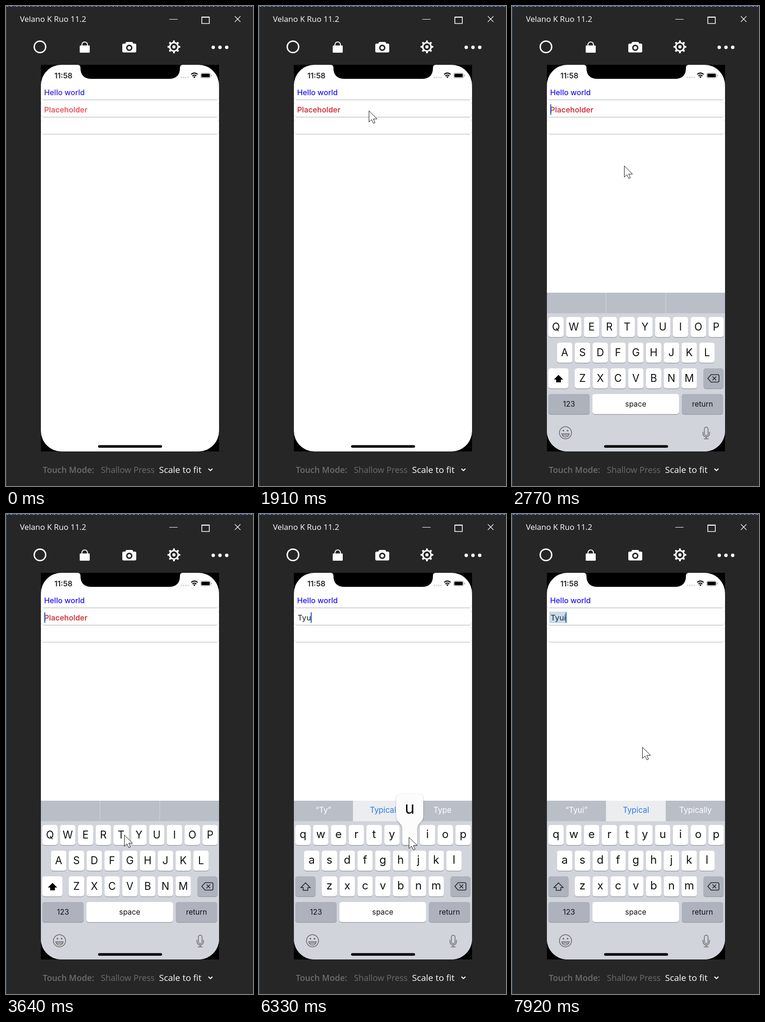
An HTML page with a canvas that plays this animation: 531x1028 px, repeating every 8 s.

```html
<!DOCTYPE html>
<html lang="en">
<head>
<meta charset="utf-8">
<title>Text entry</title>
<style>
  html, body { margin: 0; width: 531px; height: 1028px; overflow: hidden; background: #262626; }
  canvas { display: block; }
</style>
</head>
<body>
<canvas id="stage" width="531" height="1028"></canvas>
<script>
const c = document.getElementById('stage').getContext('2d');
const LOOP = 8000, UI = '"Open Sans", sans-serif', PHONE = 'Inter, sans-serif';
const ROWS = ['qwertyuiop', 'asdfghjkl', 'zxcvbnm'];
const ROW_X = [78, 96.7, 135], ROW_Y = [666, 721, 776], PITCH = 38.25, KEY_W = 33, KEY_H = 43;

// Timed states: the last entry whose time has passed applies.
const TYPED = [[0, ''], [4130, 'T'], [5180, 'Ty'], [6330, 'Tyu'], [7520, 'Tyui']];
const POPUP = [[0, ''], [3860, 'T'], [4200, ''], [4930, 'y'], [5250, ''],
  [6110, 'u'], [6440, ''], [7260, 'i'], [7590, '']];
const HINTS = [[0, []], [4200, ['“T”', 'The', 'This']], [5250, ['“Ty”', 'Typical', 'Type']],
  [6440, ['“Tyu”', 'Typical', 'Typically']], [7590, ['“Tyui”', 'Typical', 'Typically']]];
const GREY = '#686868', BLUE = '#3b70dd';
const CARET = [[0, ''], [2540, GREY], [2610, BLUE], [3080, GREY], [3170, ''], [3350, GREY], [3420, BLUE],
  [3860, GREY], [3930, ''], [4130, BLUE], [4600, ''], [4930, GREY], [5180, BLUE], [5700, ''],
  [6110, GREY], [6330, BLUE], [6800, ''], [7260, GREY], [7520, BLUE]];
const SLIDE = [[0, 400], [2540, 57], [2610, 15], [2690, 0]];
const POINTER = [[320, 436, 985], [470, 315, 637], [660, 315, 637], [900, 303, 372], [1360, 240, 222],
  [1480, 238, 219], [1550, 236, 222], [1909, 236, 222], [1910, 236, 224], [2610, 236, 224],
  [3250, 256, 694], [3480, 254, 690], [3639, 254, 690], [3640, 254, 687], [4130, 254, 687],
  [4700, 278, 692], [5180, 278, 692], [5860, 322, 692], [6590, 322, 692], [7260, 361, 691],
  [7520, 361, 691], [7920, 280, 499]];

const at = (steps, t) => steps.findLast(s => s[0] <= t)[1];

function rect(x, y, w, h, color, r = 0) {
  c.fillStyle = color;
  c.beginPath();
  c.roundRect(x, y, w, h, r);
  c.fill();
}
function disc(x, y, r, color) {
  c.fillStyle = color;
  c.beginPath();
  c.arc(x, y, r, 0, 7);
  c.fill();
}
function text(s, x, y, size, color, font = PHONE, align = 'left', weight = 400) {
  c.font = `${weight} ${size}px ${font}`;
  c.textAlign = align;
  c.fillStyle = color;
  c.fillText(s, x, y);
}
function shape(d, x, y, { fill, stroke, width = 1 }) {
  c.save();
  c.translate(x, y);
  const p = new Path2D(d);
  if (fill) { c.fillStyle = fill; c.fill(p); }
  if (stroke) { c.strokeStyle = stroke; c.lineWidth = width; c.stroke(p); }
  c.restore();
}
const line = (d, x, y, width, stroke = '#fff') => shape(d, x, y, { stroke, width });

function drawWindow(focused) {
  rect(0, 0, 531, 1028, '#262626');
  rect(0, 1, 531, 1, focused ? '#27445f' : '#343434');
  rect(0, 1, 1, 1027, focused ? '#2b5375' : '#424242');
  rect(0, 0, 531, 1, '#2f4fd0');
  for (let x = 2; x < 531; x += 7 + (x * 5) % 9) {
    rect(x, 0, 3, 1, '#e4e4f4');
    rect(x + 3, 0, 2, 1, '#16166a');
  }

  text('Velano K Ruo 11.2', 30, 34, 17, '#fff', UI);
  line('M0 0H18', 351, 28.5, 1);
  line('M0 0H16V14H0Z', 421, 23.5, 1.6);
  line('M0 1H16', 421, 23, 2);
  line('M0 0L12 12M12 0L0 12', 492, 22, 1.3);

  line('M12.3 0A12.3 12.3 0 1 1-12.3 0A12.3 12.3 0 1 1 12.3 0', 73, 87.5, 3);
  rect(158.5, 84.5, 21.5, 15.5, '#fff', 1.5);
  line('M-6 0V-3A6 6 0 0 1 6-3V0', 169.2, 86, 2);
  rect(250, 80.5, 30, 19, '#fff', 3);
  rect(257, 77, 16, 8, '#fff', 3);
  disc(265, 89.5, 6.8, '#262626');
  disc(265, 89.5, 3.6, '#fff');
  for (let i = 0; i < 8; i++) {
    c.save();
    c.translate(361, 87.5);
    c.rotate(i * Math.PI / 4);
    rect(-2, -13.7, 4, 5, '#fff', 1);
    c.restore();
  }
  line('M9 0A9 9 0 1 1-9 0A9 9 0 1 1 9 0', 361, 87.5, 3.2);
  disc(361, 87.5, 3.4, '#fff');
  for (const x of [445.5, 460, 474.5]) disc(x, 88.5, 3.7, '#fff');

  text('Touch Mode:', 79, 1000, 18, '#6c6c6c', UI, 'left', 600);
  text('Shallow Press', 204, 1000, 18.2, '#6c6c6c', UI);
  text('Scale to fit', 329, 1000, 19, '#fff', UI);
  line('M0 0L4.3 4L8.6 0', 435.2, 991, 2.3);
}

function drawStatus() {
  shape('M154 126Q160 126 160 132V132Q160 156 184 156H350Q374 156 374 132V132Q374 126 380 126Z', 0, 0, { fill: '#000' });
  text('11:58', 104, 154.5, 16, '#222', PHONE, 'left', 600);
  for (let i = 0; i < 4; i++) disc(377 + i * 4.8, 153, 1.7, '#d2d2d2');
  line('M-7-4.5Q0-10.5 7-4.5M-4.3-1.2Q0-5 4.3-1.2', 405, 151, 2.3, '#111');
  shape('M-2.5 0Q0-2 2.5 0L0 3Z', 405, 151.5, { fill: '#111' });
  c.strokeStyle = '#999';
  c.lineWidth = 1;
  c.beginPath();
  c.roundRect(418.5, 143.5, 21, 10.5, 3);
  c.stroke();
  rect(420, 145, 18, 7.5, '#000', 1.5);
  rect(441, 147, 1.5, 4, '#999', 1);
}

function drawFields(t) {
  for (const y of [201, 238, 274.5]) {
    line('M-188-31Q-191-31-191-27M188-31Q191-31 191-27M-191-5Q-191 0-186 0M191-5Q191 0 186 0', 266.5, y, 1, '#dedede');
    line('M80 0H453', 0, y, 1.4, '#c6c6c6');
  }
  const typed = at(TYPED, t), caret = at(CARET, t), early = t < 1910;
  text('Hello world', 82, 191, 16.2, early ? '#3024dc' : '#2014f0', PHONE, 'left', 500);
  if (typed) text(typed, 83, 228, 16.5, '#222');
  else text('Placeholder', 82, 228, 16.4, early ? '#ee4048' : '#cc2028', PHONE, 'left', 500);
  const end = typed ? Math.round(83 + c.measureText(typed).width) - 1 : 82;
  if (t >= 6590) {
    rect(80, 209, end - 79, 25, '#c9dcec');
    text(typed, 83, 228, 16.5, '#222');
  }
  if (caret) rect(end, 210.5, 2.5, 22.5, caret);
}

function key(x, y, w, color = '#fff') {
  rect(x, y + 1.3, w, KEY_H, '#92959c', 5);
  rect(x, y, w, KEY_H, color, 5);
}

function drawPopup(letter) {
  const row = ROWS.findIndex(r => r.includes(letter.toLowerCase()));
  const x = ROW_X[row] + ROWS[row].indexOf(letter.toLowerCase()) * PITCH + KEY_W / 2;
  c.save();
  c.shadowColor = 'rgba(0,0,0,.3)';
  c.shadowBlur = 3;
  c.shadowOffsetY = 1;
  shape('M-19-67H19Q29-67 29-57V-19Q29-12 25-8L19-1Q16 3 16 8V38Q16 43 11 43H-11Q-16 43-16 38V8Q-16 3-19-1L-25-8Q-29-12-29-19V-57Q-29-67-19-67Z',
    x, ROW_Y[row], { fill: '#fcfcfc' });
  c.restore();
  text(letter, x, ROW_Y[row] - 24, 36, '#111', PHONE, 'center');
}

function drawKeyboard(t) {
  const dy = at(SLIDE, t), hints = at(HINTS, t), upper = t < 4200, popup = at(POPUP, t);
  if (dy > 340) return;
  c.save();
  c.translate(0, dy);
  rect(75, 614, 383, 400, '#d1d4db');
  rect(75, 614, 383, 44, '#babec7');
  const corrected = hints[1] === 'Typical';
  if (corrected) rect(202, 614, 128.5, 44, '#ebedef');
  else for (const x of [202, 330]) rect(x, 614, 1, 44, '#d3d6dc');
  hints.forEach((h, i) => text(h, 138.5 + i * 128, 640, 16.7,
    corrected && i === 1 ? '#2f7be5' : '#fff', PHONE, 'center'));

  ROWS.forEach((row, r) => [...row].forEach((ch, i) => {
    const x = ROW_X[r] + i * PITCH, y = ROW_Y[r];
    key(x, y, KEY_W);
    text(upper ? ch.toUpperCase() : ch, x + KEY_W / 2, y + (upper ? 29 : 28), upper ? 22.3 : 24, '#111', PHONE, 'center');
  }));

  const grey = '#adb2bd';
  key(78, 776, 43.5, upper ? '#fff' : grey);
  shape('M0-8L10 2H5V8H-5V2H-10Z', 100, 798, upper ? { fill: '#000' } : { stroke: '#222', width: 1.6 });
  key(411.7, 776, 43, grey);
  line('M-12 0L-5-8H9Q12-8 12-5V5Q12 8 9 8H-5ZM-2-4L6 4M6-4L-2 4', 433, 797.5, 1.6, '#222');
  for (const [label, x, w, color] of [['123', 78, 89, grey], ['space', 173, 186, '#fff'], ['return', 365, 89, grey]]) {
    key(x, 831, w, color);
    text(label, x + w / 2, 857.5, 15.8, '#111', PHONE, 'center');
  }

  line('M13 0A13 13 0 1 1-13 0A13 13 0 1 1 13 0M-8 2H8Q7 9 0 9Q-7 9-8 2ZM-7 5H7', 115, 914, 1.5, '#666');
  disc(110.5, 909.5, 1.7, '#666');
  disc(119.5, 909.5, 1.7, '#666');
  line('M-4-8A4 4 0 0 1 4-8V2A4 4 0 0 1-4 2ZM-7-2V2A7 7 0 0 0 7 2V-2M0 9V13M-5 13H5', 417.5, 914, 1.5, '#666');

  if (popup) drawPopup(popup);
  c.restore();
}

function drawPointer(t) {
  if (t < POINTER[0][0]) return;
  const i = POINTER.findLastIndex(p => p[0] <= t), a = POINTER[i], b = POINTER[i + 1] || a;
  const f = b === a ? 0 : (t - a[0]) / (b[0] - a[0]);
  const [x, y] = [1, 2].map(k => Math.round(a[k] + (b[k] - a[k]) * f));
  shape('M0 0V24L5.5 18.8L9.5 27L13 25.5L9.3 17.5H17.5Z', x + .5, y + .5, { fill: '#fff', stroke: '#111' });
}

function draw(now) {
  const t = now % LOOP;
  drawWindow(t >= 1910);
  rect(75, 126, 383, 828, '#000');
  c.save();
  c.beginPath();
  c.roundRect(75, 126, 383, 828, 44);
  c.clip();
  rect(75, 126, 383, 828, '#fff');
  drawStatus();
  drawFields(t);
  drawKeyboard(t);
  rect(198, 940.5, 137.5, 5.5, '#000', 2.7);
  c.restore();
  drawPointer(t);
  requestAnimationFrame(() => draw(performance.now()));
}
draw(0);
</script>
</body>
</html>
```
